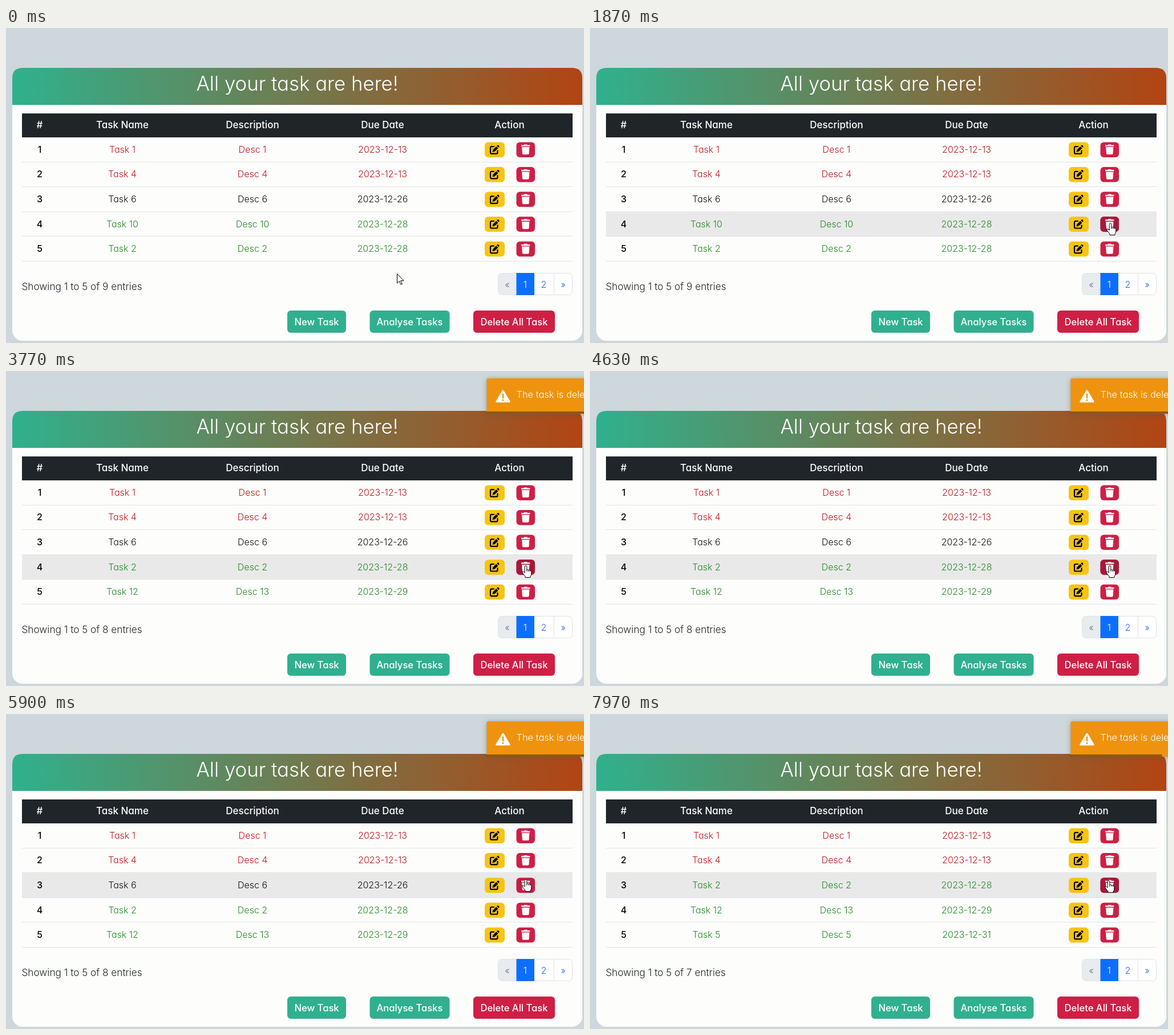
Write an HTML page that moves like this. It is 1013 px wide and 553 px high and loops after 8 s.

```html
<!DOCTYPE html>
<html lang="en">
<head>
<meta charset="utf-8">
<title>Task list</title>
<style>
  html, body { margin: 0; width: 100%; height: 100%; overflow: hidden; background: #ced7db; }
  svg { display: block; width: 1013px; height: 553px; }
  text { font: 300 16px Inter, "Open Sans", sans-serif; font-feature-settings: "cv11"; }
  .title { font-size: 34.8px; fill: #fff; }
  .head { font-size: 17px; font-weight: 500; fill: #fff; }
  .num { font-weight: 500; fill: #000; }
  .btn { font-size: 16.6px; font-weight: 500; fill: #fff; }
  .foot { font-size: 17.2px; fill: #212529; }
  .toast { filter: drop-shadow(0 1px 4px rgba(90, 90, 90, .5)); }
  .toast text { font-size: 16.4px; fill: #fff; }
</style>
</head>
<body>
<svg id="stage" viewBox="0 0 1013 553">
  <defs>
    <linearGradient id="banner">
      <stop offset="0" stop-color="#2fb18d"/>
      <stop offset="1" stop-color="#b24412"/>
    </linearGradient>
    <g id="edit">
      <path d="M-1-5.5H-5Q-7-5.5-7-3.5V5Q-7 7-5 7H3.5Q5.5 7 5.5 5V1.8" fill="none" stroke="#000" stroke-width="2.2" stroke-linecap="round"/>
      <path d="M-3.5 4L-2.6 0L3.2-5.8L6.4-2.6L.6 3.1ZM4.2-6.8L5.4-8Q6.4-8.7 7.4-7.7L8.1-7Q9-6 8.3-5.1L7.2-3.7Z"/>
    </g>
    <path id="trash" fill="#fff" d="M-7.6-7.9H-3L-2.4-9H2.4L3-7.9H7.6V-5.6H-7.6ZM-6.7-4.3H6.7L5.8 7.1Q5.6 8.7 4 8.7H-4Q-5.6 8.7-5.8 7.1Z"/>
  </defs>
  <rect width="1013" height="553" fill="#ced7db"/>
  <rect x="11" y="70" width="999" height="479" rx="18" fill="#fdfdfc"/>
  <path d="M11 135V88Q11 70 29 70H992Q1010 70 1010 88V135Z" fill="url(#banner)"/>
  <rect x="28" y="150" width="965" height="42" fill="#1f2528"/>
  <g id="page"></g>

  <rect x="862.5" y="430.5" width="130" height="38" rx="6" fill="#fff" stroke="#dee2e6"/>
  <path d="M895 431H868.5Q863 431 863 436.5V462.5Q863 468 868.5 468H895Z" fill="#e9ecef"/>
  <path d="M960.5 431V468" stroke="#dee2e6"/>
  <rect x="894.5" y="430" width="31.5" height="39" fill="#0d6efd"/>

  <g id="toast" class="toast">
    <rect x="842.5" y="13" width="300" height="62" rx="2" fill="#ef930e"/>
    <rect id="bar" x="842.5" y="71" height="4" fill="#000" fill-opacity=".4"/>
    <path d="M871 34.5L882.5 54H859.5Z" fill="#fff" stroke="#fff" stroke-width="2.5" stroke-linejoin="round"/>
    <path d="M871 40.5V47" stroke="#ef930e" stroke-width="2.6" stroke-linecap="round"/>
    <circle cx="871" cy="51" r="1.6" fill="#ef930e"/>
    <text x="894.5" y="47">The task is deleted</text>
  </g>

  <g id="cursor" fill="#fff" stroke="#000" stroke-linejoin="round">
    <path id="arrow" d="M.5.5V17L4.3 13.4L7 19.5L9.3 18.5L6.7 12.6H12Z"/>
    <g id="hand">
      <path d="M-1.8 1.6Q0-1 1.8 1.6V8Q3.4 6.6 4.8 8.4Q6.4 7.4 7.4 9.2Q9.6 8.6 9.8 11V15Q9.8 18 7.8 20V21.5H-1V19.5Q-3 17.5-6 13Q-7 10.6-4.6 10.8L-1.8 13Z"/>
      <path d="M1.8 8V11M4.8 8.4V11M7.4 9.2V11" fill="none"/>
    </g>
  </g>
</svg>
<script>
const NS = 'http://www.w3.org/2000/svg';
const byId = id => document.getElementById(id);
const page = byId('page');
const LOOP = 8000, TOP = 192, STEP = 43.6;
const FIRST_DELETE = 3050, SECOND_DELETE = 7850;
const RED = '#c2141b', GREEN = '#238a24', BLACK = '#111', TEAL = '#30b08f', CRIMSON = '#cf1f45';
const clamp = v => Math.max(0, Math.min(1, v));

function add(tag, attrs, content) {
  const el = document.createElementNS(NS, tag);
  for (const key in attrs) el.setAttribute(key, attrs[key]);
  if (content !== undefined) el.textContent = content;
  return page.appendChild(el);
}

function label(content, x, y, cls = '', fill, anchor = 'middle') {
  const attrs = { x, y, class: cls, 'text-anchor': anchor };
  if (fill) attrs.fill = fill;
  return add('text', attrs, content);
}

const box = (x, y, width, height, fill, rx = 0) => add('rect', { x, y, width, height, fill, rx });

function setText(el, value) {
  if (el.textContent !== value) el.textContent = value;
}

const tasks = [
  ['Task 1', 'Desc 1', '2023-12-13', RED],
  ['Task 4', 'Desc 4', '2023-12-13', RED],
  ['Task 6', 'Desc 6', '2023-12-26', BLACK],
  ['Task 10', 'Desc 10', '2023-12-28', GREEN],
  ['Task 2', 'Desc 2', '2023-12-28', GREEN],
  ['Task 12', 'Desc 13', '2023-12-29', GREEN],
  ['Task 5', 'Desc 5', '2023-12-31', GREEN]
];

label('All your task are here!', 510.5, 110, 'title');
[['#', 59], ['Task Name', 204], ['Description', 432], ['Due Date', 660], ['Action', 882.5]]
  .forEach(([name, x]) => label(name, x, 176.3, 'head'));

const rows = [0, 1, 2, 3, 4].map(i => {
  const y = TOP + i * STEP, mid = y + 21.4;
  const back = box(28, y, 965, STEP, '#e9e9e9');
  box(28, Math.round(y + STEP) - 1, 965, 1, '#dee2e6');
  label(i + 1, 59, mid + 5.3, 'num');
  const cells = [204, 432, 660].map(x => label('', x, mid + 5.3));
  box(839, mid - 13, 35, 26.5, '#f6c414', 6);
  add('use', { href: '#edit', x: 856, y: mid + 0.3 });
  box(894.5, mid - 13, 32.5, 26.5, CRIMSON, 6);
  const dark = box(894.5, mid - 13, 32.5, 26.5, '#a5193a', 6);
  add('use', { href: '#trash', x: 910.7, y: mid });
  return { y, mid, back, cells, dark };
});

const summary = label('', 27.5, 459.5, 'foot', null, 'start');
[['New Task', 493, 103, TEAL], ['Analyse Tasks', 637.5, 140, TEAL], ['Delete All Task', 819, 143, CRIMSON]]
  .forEach(([name, x, width, fill]) => {
    box(x, 496, width, 39, fill, 6);
    label(name, x + width / 2, 521.5, 'btn');
  });

// Page links sit above the pagination boxes.
[['«', 878.5, '#6c757d'], ['1', 910, '#fff'], ['2', 942.5, '#2463e6'], ['»', 976.5, '#2463e6']]
  .forEach(([name, x, fill]) => byId('stage').insertBefore(label(name, x, 455.7, '', fill), byId('toast')));

// Pointer path: time, x, y
const path = [
  [0, 685, 431], [150, 687, 429], [800, 836, 331], [930, 847, 325], [1150, 866, 327],
  [1500, 908, 336], [1750, 912, 342], [2300, 912, 342], [2700, 911, 341], [5500, 911, 341],
  [5700, 911, 331], [5850, 911, 315], [5900, 911, 290], [6200, 909.5, 292], [LOOP, 909, 292]
];

function pointerAt(t) {
  const i = Math.max(1, path.findIndex(p => p[0] > t));
  const [t0, x0, y0] = path[i - 1], [t1, x1, y1] = path[i];
  const p = clamp((t - t0) / (t1 - t0)), e = p * p * (3 - 2 * p);
  return [x0 + (x1 - x0) * e, y0 + (y1 - y0) * e];
}

// Times at which the pointer enters and leaves a delete button, by row.
const hovers = { 3: [1420, 5700], 2: [5870, Infinity] };
const ramp = (t, start) => clamp((t - start) / 150);

function draw(t) {
  const [x, y] = pointerAt(t);
  let list = tasks;
  if (t >= FIRST_DELETE) list = list.filter(task => task[0] !== 'Task 10');
  if (t >= SECOND_DELETE) list = list.filter(task => task[0] !== 'Task 6');
  const total = list.length + 2;
  setText(summary, `Showing 1 to 5 of ${total} entries`);

  let overButton = false;
  rows.forEach((row, i) => {
    const over = y >= row.y && y < row.y + STEP;
    row.back.setAttribute('opacity', over ? 1 : 0);
    row.cells.forEach((cell, c) => {
      setText(cell, list[i][c]);
      cell.setAttribute('fill', list[i][3]);
    });
    const hover = hovers[i];
    row.dark.setAttribute('opacity', hover ? ramp(t, hover[0]) - ramp(t, hover[1]) : 0);
    if (x >= 894.5 && x <= 927 && Math.abs(y - row.mid) <= 13.2) overButton = true;
  });

  const fade = clamp((t - 3130) / 300);
  byId('toast').setAttribute('opacity', 0.5 - Math.cos(Math.PI * fade) / 2);
  byId('bar').setAttribute('width', 300 * (1 - Math.max(0, t - 3300) / 10000));

  byId('cursor').setAttribute('transform', `translate(${Math.round(x)} ${Math.round(y)})`);
  byId('arrow').setAttribute('visibility', overButton ? 'hidden' : 'visible');
  byId('hand').setAttribute('visibility', overButton ? 'visible' : 'hidden');
}

const start = performance.now();
function tick() {
  draw((performance.now() - start) % LOOP);
  requestAnimationFrame(tick);
}
tick();
</script>
</body>
</html>
```
